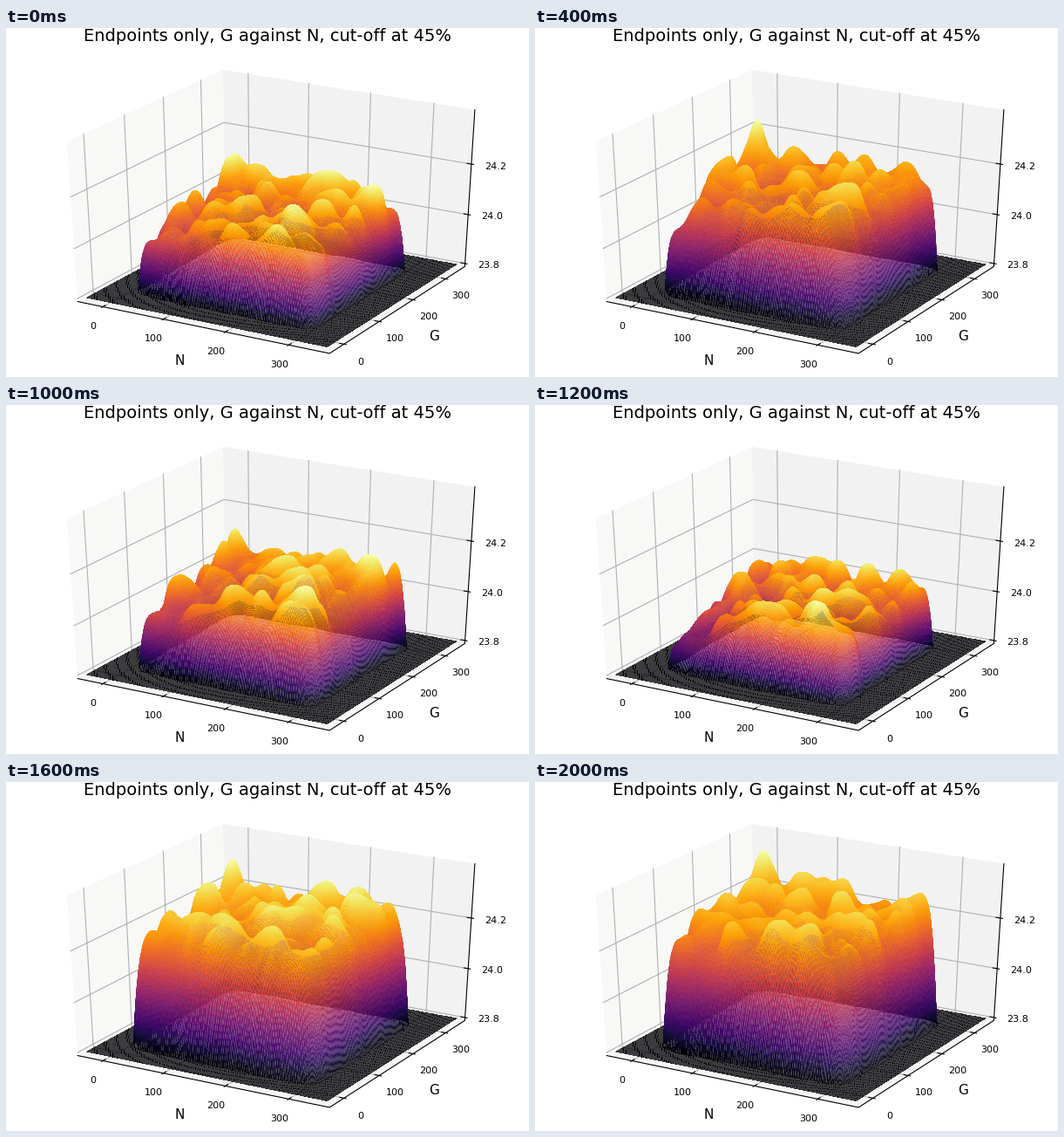
Animation of 600 by 400 pixels, one loop 2.2 s. Source, as a matplotlib script:

```python
import numpy as np
import matplotlib.pyplot as plt
from matplotlib.animation import ArtistAnimation

W, H, DPI = 600, 400, 100
CELLS = 389            # one cell per unit of N and G
B = 0.5208             # half size of the drawn box; the data fill +-0.5
TICK_IN, TICK_OUT = .0174, .0087
TICK_PAD, NAME_PAD = .0662, .144

# plateau height at each step, in box heights
LEVELS = [.50, .56, .66, .36, .42, .52, .42, .74, .80, .04, .81]

plt.rcParams["font.family"] = "DejaVu Sans"
plt.rcParams["text.kerning_factor"] = 6


def project(x, y, z):
    """Perspective view from azimuth -60, elevation 30, in stage pixels."""
    depth = 10 - (.4330 * x - .75 * y + .5 * z)
    right = .8660 * x + .5 * y
    up = -.25 * x + .4330 * y + .8660 * z
    return 307.9 + 3202 * right / depth, 204.7 - 2011.5 * up / depth


def n_pos(n):
    return -.4125 + .002569 * n


def g_pos(g):
    return -.4176 + .0026 * g


def z_pos(v):
    return -.5 + 1.68 * (v - 23.8)


# rows run from the far side to the near side, so painting order is right
xs = np.linspace(-.5, .5, CELLS + 1)
ys = xs[::-1]
X, Y = np.meshgrid(xs, ys)


def bell(a, centre, sigma):
    return np.exp(-.5 * ((a - centre) / sigma) ** 2)


def bumps(seed):
    """Smoothed random points, scaled to unit spread and softly limited."""
    rng = np.random.default_rng(seed)
    px, py = rng.uniform(-.45, .45, (2, 420))
    d = bell(ys[:, None], py, .026) @ bell(xs[:, None], px, .026).T
    inner = d[60:-60, 60:-60]
    d = (d - inner.mean()) / inner.std()
    return 1.9 * np.tanh(d / 1.9)


def cliff(a, centre, half):
    return .3 * np.logaddexp(0, (np.abs(a - centre) - half) / .014)


def heights(step):
    level = LEVELS[step]
    h = level + .25 * (1 - level) * X + .065 * bumps(step + 40)
    h += .27 * level * bell(X, -.34, .035) * bell(Y, .25, .05)
    h -= .1 * bell(X, -.36, .15) * bell(Y, -.36, .15)
    h -= cliff(X, -.003, .359) + cliff(Y, -.016, .349)
    return np.maximum(h, 0)


fig = plt.figure(figsize=(W / DPI, H / DPI), dpi=DPI, facecolor="white")
ax = fig.add_axes([0, 0, 1, 1])


def path(points, **style):
    px, py = project(*np.array(points, float).T)
    ax.plot(px, py, **style)


def pane(points, color):
    px, py = project(*np.array(points, float).T)
    ax.fill(px, py, color=color, lw=0, zorder=0)


def label(point, text, size=8, va="top"):
    ax.text(*project(*point), text, fontsize=size, ha="center", va=va)


pane([(-B, -B, -B), (-B, B, -B), (-B, B, B), (-B, -B, B)], "#f8f8f7")
pane([(-B, B, -B), (B, B, -B), (B, B, B), (-B, B, B)], "#f2f2f2")
pane([(-B, -B, -B), (B, -B, -B), (B, B, -B), (-B, B, -B)], "#f6f6f6")

grid = dict(color="#b0b0b0", lw=.8, zorder=1)
line = dict(color="black", lw=.8, zorder=3)
far = B + TICK_PAD

for v in (0, 100, 200, 300):
    a, b = n_pos(v), g_pos(v)
    path([(a, -B, -B), (a, B, -B), (a, B, B)], **grid)
    path([(B, b, -B), (-B, b, -B), (-B, b, B)], **grid)
    path([(a, -B - TICK_OUT, -B), (a, -B + TICK_IN, -B)], **line)
    path([(B - TICK_IN, b, -B), (B + TICK_OUT, b, -B)], **line)
    label((a, -far, -far), str(v))
    label((far, b, -far), str(v))
for v in (23.8, 24.0, 24.2):
    c = z_pos(v)
    path([(-B, -B, c), (-B, B, c), (B, B, c)], **grid)
    path([(B - TICK_IN, B, c), (B + TICK_OUT, B, c)], **line)
    label((far, far, c), f"{v:.1f}")

path([(-B, -B, -B), (B, -B, -B), (B, B, -B), (B, B, B)], **line)

far = B + NAME_PAD
label((0, -far, -far), "N", 11, "center")
label((far, 0, -far), "G", 11, "center")
ax.text(W / 2, 15, "Endpoints only, G against N, cut-off at 45%",
        fontsize=14, ha="center", va="baseline")

steps = []
for k in range(len(LEVELS)):
    h = heights(k)
    px, py = project(X, Y, h - .5)
    face = (h[1:, 1:] + h[1:, :-1] + h[:-1, 1:] + h[:-1, :-1]) / 4
    # antialiased hairline seams give the surface its translucent sheen
    mesh = ax.pcolormesh(px, py, face, cmap="inferno", vmin=0, vmax=h.max(),
                         shading="flat", antialiased=True, edgecolors="none",
                         zorder=2)
    steps.append([mesh])

ax.set_xlim(0, W)
ax.set_ylim(H, 0)
ax.axis("off")

anim = ArtistAnimation(fig, steps, interval=200, repeat=True, repeat_delay=0,
                       blit=False)
plt.show()
```
